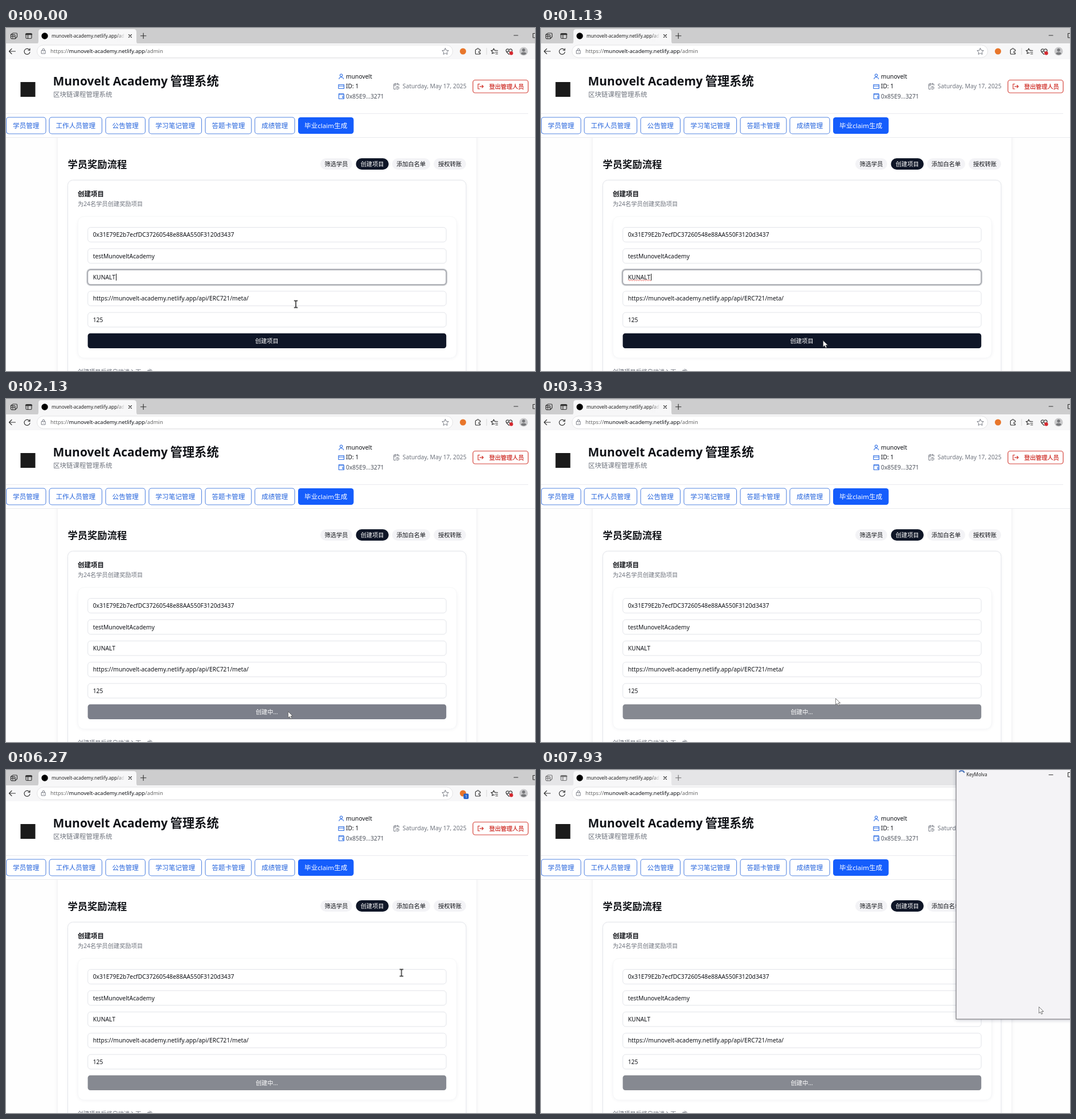
Write an HTML page that moves like this. It is 929x603 px and loops after 8 s.

```html
<!DOCTYPE html>
<html lang="zh-CN">
<head>
<meta charset="utf-8">
<title>管理系统</title>
<style>
html, body { margin: 0; width: 100%; height: 100%; overflow: hidden; background: #fff; }
svg { display: block; width: 929px; height: 603px; }
text { font-family: 'Noto Sans', 'Noto Sans CJK SC', sans-serif; white-space: pre; }
.ico { fill: none; stroke: #333; stroke-width: 1.15; stroke-linecap: round; stroke-linejoin: round; }
.ico.blue { stroke: #2f6fe4; }
.ico.gray { stroke: #777b84; stroke-width: 1; }
.ico.red { stroke: #cf2f28; }
.a { animation: 8s step-end infinite; }

#strip { animation-name: strip; }
#stripIcons { animation-name: dim; }
#ring { animation-name: ring; }
#caret { animation-name: caret; }
#spell { animation-name: spell; }
#idle { animation-name: idle; }
#busy, #badge, #popup, #named { opacity: 0; }
#busy { animation-name: busy; }
#badge { animation-name: badge; }
#popup { animation-name: popup; }
#link { animation-name: link; }
#named { animation-name: named; }
#spin { animation-name: spin; transform-origin: 739px 7px; }
#go { animation: go 8s linear infinite; }
#cur { animation-name: move; }
#beam { animation-name: beam; }
#arrow { animation-name: arrow; }

@keyframes strip { 0% { fill: #cdcdce } 89.125%, 100% { fill: #e5e5e7 } }
@keyframes dim { 0% { opacity: 1 } 89.125%, 100% { opacity: .65 } }
@keyframes ring { 0% { opacity: 1 } 21.625%, 100% { opacity: 0 } }
@keyframes caret { 0% { opacity: 1 } 5.875% { opacity: 0 } 12.5% { opacity: 1 } 19.125%, 100% { opacity: 0 } }
@keyframes spell { 0% { opacity: 0 } 10.875% { opacity: 1 } 21.625%, 100% { opacity: 0 } }
@keyframes idle { 0% { opacity: 1 } 25%, 100% { opacity: 0 } }
@keyframes busy { 0% { opacity: 0 } 25%, 100% { opacity: 1 } }
@keyframes badge { 0% { opacity: 0 } 76.625%, 100% { opacity: 1 } }
@keyframes popup { 0% { opacity: 0 } 89.125%, 100% { opacity: 1 } }
@keyframes link { 0% { opacity: 1 } 93.375%, 100% { opacity: 0 } }
@keyframes named { 0% { opacity: 0 } 93.375%, 100% { opacity: 1 } }
@keyframes spin {
  0% { transform: rotate(0) } 93.375% { transform: rotate(185deg) }
  96.625% { transform: rotate(326deg) } 99.125%, 100% { transform: rotate(435deg) }
}
@keyframes go {
  0%, 24.99% { fill: #0f1627 } 25% { fill: #5c616d }
  26.625% { fill: #7c7f8a } 34%, 100% { fill: #868991 }
}
@keyframes beam { 0% { opacity: 1 } 5.875% { opacity: 0 } 43.375% { opacity: 1 } 89.125%, 100% { opacity: 0 } }
@keyframes arrow { 0% { opacity: 0 } 5.875% { opacity: 1 } 43.375% { opacity: 0 } 89.125%, 100% { opacity: 1 } }
@keyframes move {
  0% { transform: translate(509px, 485.5px) }
  1.625% { transform: translate(509px, 491px) }
  2.875% { transform: translate(508px, 506px) }
  4.125% { transform: translate(507px, 521px) }
  5.875% { transform: translate(503px, 538px) }
  7.125% { transform: translate(498px, 546px) }
  8.375% { transform: translate(495px, 549px) }
  39.125% { transform: translate(496px, 548px) }
  40.875% { transform: translate(501px, 541px) }
  41.625% { transform: translate(517px, 526px) }
  43.375% { transform: translate(560px, 484px) }
  45% { transform: translate(642px, 410px) }
  46.625% { transform: translate(706px, 355px) }
  48.375% { transform: translate(704px, 355px) }
  50% { transform: translate(702px, 355px) }
  57.5% { transform: translate(701px, 354.5px) }
  59.125% { transform: translate(698px, 355px) }
  62.5% { transform: translate(697px, 356px) }
  69.125% { transform: translate(696px, 356.5px) }
  78.375% { transform: translate(694.5px, 356.5px) }
  89.125% { transform: translate(858px, 411.5px) }
  93.375% { transform: translate(868px, 417px) }
  96.625% { transform: translate(872px, 416px) }
  99.125%, 100% { transform: translate(874px, 416px) }
}
</style>
</head>
<body>
<svg id="stage" viewBox="0 0 929 603">
  <defs>
    <filter id="soft" x="-5%" y="-10%" width="110%" height="120%"><feGaussianBlur stdDeviation="3.5"/></filter>
    <linearGradient id="fade"><stop offset="0" stop-color="#f7f7f8" stop-opacity="0"/><stop offset="1" stop-color="#f7f7f8"/></linearGradient>
    <clipPath id="tabClip"><rect x="78" y="2" width="130" height="24"/></clipPath>
  </defs>
  <rect width="929" height="603" fill="#fefefe"/>
  <g id="content"></g>
  <g id="header"></g>
  <g id="chrome"></g>
  <g id="popup" class="a"></g>
  <g id="cur" class="a">
    <path id="beam" class="a" fill="none" stroke="#161616" stroke-width="1.4" d="M-3.2-6H-1Q0-6 0-5Q0-6 1-6H3.2M0-5V5M-3.2 6H-1Q0 6 0 5Q0 6 1 6H3.2"/>
    <path id="arrow" class="a" fill="#fff" stroke="#555" stroke-width=".8" stroke-linejoin="round" d="M.4.4V11.6L3 9.2L4.8 13.2L6.7 12.4L5 8.5H8.6Z"/>
  </g>
</svg>
<script>
const $ = id => document.getElementById(id);
const INK = '#111318', GRAY = '#6f747e', BLUE = '#2463dc', RED = '#cf2f28';

// cy is the visual middle of the line
const text = (x, cy, size, str, fill = INK, extra = '') =>
  `<text x="${x}" y="${cy + size * .37}" font-size="${size}" fill="${fill}" ${extra}>${str}</text>`;
const box = (x, y, w, h, r, extra) =>
  `<rect x="${x}" y="${y}" width="${w}" height="${h}" rx="${r}" ${extra}/>`;
const icon = (d, tone = '', extra = '') => `<path class="ico ${tone}" d="${d}" ${extra}/>`;
const shadow = (x, y, w, h, r, o) => box(x, y, w, h, r, `fill="#1b2440" opacity="${o}" filter="url(#soft)"`);
const BOLD = 'font-weight="700"', MID = 'text-anchor="middle"';

const steps = [[552, 56, '筛选学员'], [614.5, 57.5, '创建项目'], [678, 67, '添加白名单'], [751, 57, '授权转账']];
const fields = [
  '0x31E79E2b7ecfDC37260548e88AA550F3120d3437',
  'testMunoveltAcademy',
  'KUNALT',
  'https://munovelt-academy.netlify.app/api/ERC721/meta/',
  '125'
];

$('content').innerHTML =
  shadow(91, 150, 735, 520, 8, .09) + box(91, 150, 735, 520, 8, 'fill="#fff"') +
  text(108.5, 239.7, 17.3, '学员奖励流程', INK, BOLD) +
  steps.map(([x, w, s], i) =>
    box(x, 229, w, 20, 10, `fill="${i == 1 ? '#0f1627' : '#f3f3f6'}"`) +
    text(x + w / 2, 239, 10.25, s, i == 1 ? '#fff' : INK, MID)).join('') +
  shadow(109, 269, 699, 380, 9, .05) +
  box(108.5, 267.5, 699.5, 380, 9, 'fill="#fff" stroke="#e3e5ea"') +
  text(126, 292, 11.5, '创建项目', INK, BOLD) +
  text(126, 309, 10.25, '为24名学员创建奖励项目', GRAY) +
  shadow(127, 335, 664, 245, 10, .07) +
  box(126.5, 331.5, 664.5, 248.5, 10, 'fill="#fff" stroke="#f7f8f9"') +
  fields.map((s, i) => {
    const y = 350.5 + i * 37.4;
    return box(143.7, y, 629.4, 25.7, 5, 'fill="#fff" stroke="#e2e4e9"') + text(152.7, y + 12.9, 10.33, s);
  }).join('') +
  '<g id="ring" class="a" fill="none">' +
  box(142.4, 424, 631.6, 28.2, 6, 'stroke="#c6c8cc" stroke-width="2.2"') +
  box(143.5, 425.1, 629.4, 26, 5, 'stroke="#9a9ca3" stroke-width="1.1"') + '</g>' +
  '<path id="caret" class="a" d="M193.5 432V444" stroke="#111"/>' +
  `<path id="spell" class="a" d="M153 443.5${'q1 -2 2 0t2 0'.repeat(10)}" fill="none" stroke="#e2453c" stroke-width=".9"/>` +
  box(143.6, 536.8, 629.6, 26.2, 4.5, 'id="go" fill="#0f1627"') +
  `<g id="idle" class="a">${text(458, 550, 10.25, '创建项目', '#fff', MID)}</g>` +
  `<g id="busy" class="a">${text(458, 550, 10.25, '创建中...', '#fff', MID)}</g>` +
  text(126, 604, 10.15, '创建项目后将自动进入下一步', GRAY);

const tabs = [[.5, 69.5, '学员管理'], [76, 92.5, '工作人员管理'], [175, 69.5, '公告管理'], [251, 92.5, '学习笔记管理'],
  [350, 81, '答题卡管理'], [437, 70, '成绩管理'], [513, 97.5, '毕业claim生成']];

$('header').innerHTML =
  box(0, 50, 929, 142.5, 0, 'fill="#fff"') +
  box(25.5, 95, 26, 26, 0, 'fill="#1b1b1b"') +
  text(82.5, 93, 21, 'Munovelt Academy', INK, BOLD) +
  text(288.5, 93, 21.3, '管理系统', INK, BOLD) +
  text(83, 117, 11.5, '区块链课程管理系统', GRAY) +
  icon('M585 89.5Q585 86.5 588.5 86.5Q592.5 86.5 592.5 89.5M588.7 81a2.2 2.2 0 1 1-.01 0', 'blue') +
  icon('M584 99.5h9.5v7h-9.5zM584 102h9.5', 'blue') +
  icon('M593 117v-1.5h-8.5v9h9v-7.5h-9M593.5 120h-2.5v2.5h2.5', 'blue') +
  text(597, 85.3, 10.33, 'munovelt') +
  text(597, 102.5, 10.33, 'ID: 1') +
  text(597, 119.7, 10.33, '0x85E9...3271', '#4c515b') +
  icon('M690 101v-2.5h-9v9h3M681 101h4M683.5 97v2.5M687.5 97v2.5M687.5 102.5a2.7 2.7 0 1 1-.01 0M687.5 104v1.5h1', 'gray') +
  text(696.5, 102.5, 10.33, 'Saturday, May 17, 2025', GRAY) +
  box(820, 91.5, 97, 22.5, 4, 'fill="#fff" stroke="#d5433a" stroke-width="1.2"') +
  icon('M832 98.5h-3v8.5h3M832 102.8h6M836 100.5l2.3 2.3l-2.3 2.3', 'red') +
  text(848.5, 102.8, 10.2, '登出管理人员', RED, `stroke="${RED}" stroke-width=".25"`) +
  '<path d="M0 150.5H917M0 192.5H929" stroke="#e9eaee"/>' +
  tabs.map(([x, w, s], i) => {
    const on = i == 6;
    return box(x, 157, w, 29, 4.5, on ? 'fill="#155dfc"' : 'fill="#fff" stroke="#5586e2" stroke-width="1.1"') +
      text(x + w / 2, 171.8, 11.6, s, on ? '#fff' : BLUE, MID);
  }).join('');

const star = (x, y, r) => 'M' + Array.from({ length: 10 }, (_, i) => {
  const a = i * Math.PI / 5 - Math.PI / 2, k = i % 2 ? r * .48 : r;
  return (x + k * Math.cos(a)).toFixed(2) + ' ' + (y + k * Math.sin(a)).toFixed(2);
}).join('L') + 'Z';
const puzzle = 'M826 37.5h1a1.7 1.7 0 0 1 3.4 0h1q1.600 0 1.600 1.600v1.400h-1a1.700 1.700 0 0 0 0 3.400h1v.500q0 1.600-1.600 1.600h-5.400q-1.600 0-1.600-1.600v-5.300q0-1.600 1.600-1.600z'.replace(/00\b/g, '');

$('chrome').innerHTML =
  box(0, 0, 929, 28, 0, 'id="strip" class="a" fill="#cdcdce"') +
  '<path d="M53 28Q57 28 57 23V7Q57 2 62 2H224Q229 2 229 7V23Q229 28 233 28Z" fill="#f7f7f8"/>' +
  box(0, 27, 929, 28, 0, 'fill="#f7f7f8"') +
  '<g id="stripIcons" class="a">' +
  icon('M8.5 11.5l4-2.5h5.5q1.5 0 1.5 1.5v5l-3 3M8.5 11.5h6q1.5 0 1.5 1.5v6h-6l-1.5-1.5zM8.5 14.5h7.5M12 11.5v7.5') +
  icon('M36.5 9.5h7q1.5 0 1.5 1.5v6q0 1.5-1.5 1.5h-7q-1.5 0-1.5-1.5v-6q0-1.5 1.5-1.5zM38.5 11.5v7') +
  icon('M35 11h10', '', 'style="stroke-width:2.4"') +
  icon('M236.5 13.7h9.5M241.2 9v9.5M892 13h7M929 9.5h-3.5v7.5h3.5') + '</g>' +
  '<circle cx="68" cy="14" r="5.7" fill="#000"/>' +
  `<g clip-path="url(#tabClip)">${text(80, 14, 8.15, 'munovelt-academy.netlify.app/admin', '#222')}</g>` +
  box(193, 5, 16, 19, 0, 'fill="url(#fade)"') +
  icon('M215.5 11.5l5 5m0-5l-5 5') +
  box(54.5, 30, 730, 22, 11, 'fill="#fff" stroke="#e2e2e4"') +
  icon('M16.5 41h-11m4.5-4.5l-4.5 4.5l4.5 4.5M41.5 39a5 5 0 1 0 .5 3.2M42 36v3.2h-3.2') +
  icon('M62.5 39.5h6.5v5.5h-6.5zM64 39.5v-1.5a1.75 1.75 0 0 1 3.5 0v1.5M65.75 42v.5', 'gray') +
  text(78, 41, 9.45, '<tspan fill="#666">https://</tspan>munovelt-academy.netlify.app<tspan fill="#666">/admin</tspan>') +
  icon(star(771.5, 41.5, 6), 'gray') +
  '<circle cx="802.5" cy="41" r="5.5" fill="#e8762b"/>' +
  `<g id="badge" class="a">${box(803.5, 41.5, 9, 9.5, 2, 'fill="#2563c9"')}${text(808, 46.3, 7, '1', '#fff', MID)}</g>` +
  icon(puzzle) + '<path d="M844 35V47" stroke="#d5d5d7"/>' +
  icon(star(856.5, 41, 5)) +
  box(858, 40, 7, 7, 0, 'fill="#f7f7f8"') + icon('M859 39.5h4.5M859.5 42.5h4M860 45.5h3.5') +
  icon('M883.5 46.5l-4.5-4.5q-2-3 .5-4.7q2.3-1.2 4 1q1.7-2.2 4-1q2 1.5 1 4M879 41.5h2.5l1.5-2l1.5 3.5') +
  '<circle cx="887.3" cy="44.3" r="3.2" fill="#d5282f"/>' +
  '<circle cx="909" cy="41" r="7.5" fill="#c9c9cb"/><circle cx="909" cy="38.8" r="2.7" fill="#77787b"/>' +
  '<path d="M904.3 45.5q0-3 4.7-3t4.7 3q-4.7 3.5-9.4 0" fill="#77787b"/>';

$('popup').innerHTML =
  shadow(729, -10, 220, 449, 0, .3) +
  box(729, -1, 210, 439, 0, 'fill="#f4f3f6" stroke="#6d6d70"') +
  '<path id="spin" class="a" d="M734.5 10.5A5 5 0 0 1 738 2.2" fill="none" stroke="#2a5cad" stroke-width="1.8"/>' +
  `<g id="link" class="a">${text(747, 7.7, 8.1, 'extension://ejbalbakoplchlghecd...', '#222')}</g>` +
  `<g id="named" class="a">${text(747, 7.7, 8.1, 'KeyMolva', '#222')}</g>` +
  icon('M892 8.5h7M929 4.5h-3.5v7.5h3.5');
</script>
</body>
</html>
```
